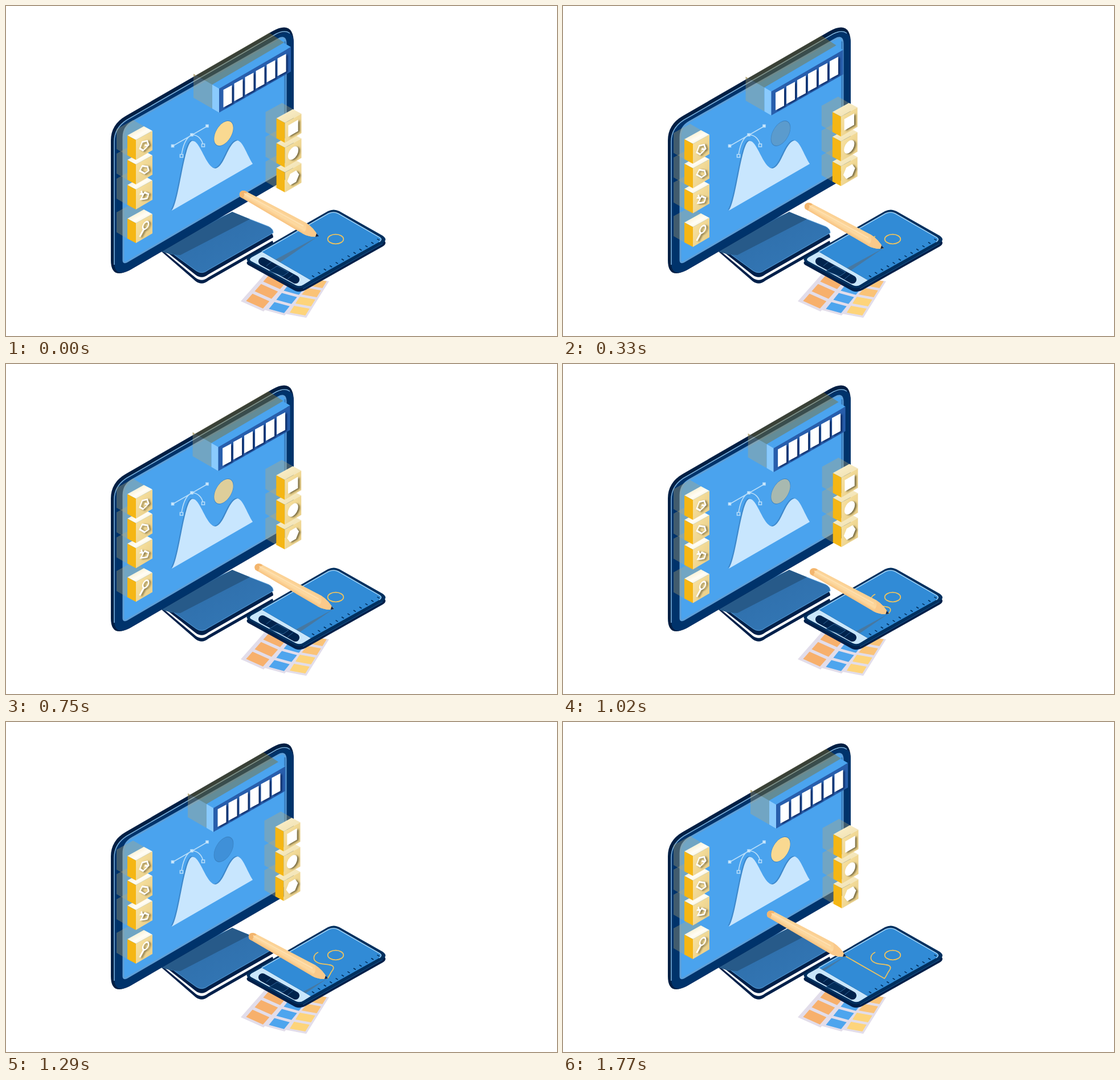
An HTML page for the animation above (1.8 s loop, 967x579 px).

```html
<!DOCTYPE html>
<html lang="en">
<head>
<meta charset="utf-8">
<title>Design workspace</title>
<style>
  html, body { margin: 0; width: 100%; height: 100%; overflow: hidden; background: #fff; }
  svg { display: block; width: 967px; height: 579px; }
  .cast { filter: drop-shadow(3px 1px 1.5px rgba(50, 45, 20, .6)); }
  .castBlue { filter: drop-shadow(3px 1px 1.5px rgba(0, 20, 70, .7)); }
  .ghost { fill: rgba(185, 168, 115, .35); }
  .ghostLid { fill: rgba(130, 110, 40, .44); }
</style>
</head>
<body>
<svg viewBox="0 0 967 579">
  <defs>
    <linearGradient id="lid" x1="0" y1="0" x2="1" y2="1">
      <stop offset="0" stop-color="#f5e3ac"/><stop offset=".55" stop-color="#fffdf6"/><stop offset="1" stop-color="#f8e6b4"/>
    </linearGradient>
    <linearGradient id="lidRight" x1="0" y1="0" x2="1" y2="1">
      <stop offset="0" stop-color="#fdf1cd"/><stop offset="1" stop-color="#eedfae"/>
    </linearGradient>
    <linearGradient id="front" x1="0" y1="0" x2="1" y2="1">
      <stop offset="0" stop-color="#fae4a4"/><stop offset="1" stop-color="#e6cb84"/>
    </linearGradient>
    <linearGradient id="wood" gradientUnits="userSpaceOnUse" x1="-70" y1="-48" x2="-80" y2="-31">
      <stop offset="0" stop-color="#fbd092"/><stop offset=".45" stop-color="#fdd9a0"/><stop offset="1" stop-color="#f5b56c"/>
    </linearGradient>
    <linearGradient id="stand" x1="0" y1="0" x2="1" y2="1">
      <stop offset="0" stop-color="#2d6ba6"/><stop offset="1" stop-color="#3479b8"/>
    </linearGradient>
    <path id="hills" d="M291 359C304 341 312 244 326 237C340 232 350 283 367 285C383 284 389 240 406 236C416 237 423 262 433 277Z"/>
    <path id="plate" d="M428 439L565 360Q575 355 585 360L661 403Q671 410 661 416L526 492Q516 498 506 493L428 450Q417 445 428 439Z"/>
    <clipPath id="glass"><path d="M449 431L566 364Q575 360 583 364L656 406Q661 410 655 414L535 481Z"/></clipPath>
  </defs>

  <g id="layers"></g>
  <path d="M270 430L397 361L428 374L306 437L290 436Z" fill="#275a89"/>

  <g id="monitor">
    <path d="M184 236Q184 208 210 193L468 44Q505 24 505 66V272Q505 296 488 306L216 464Q184 480 184 446Z" fill="#011f44"/>
    <path d="M190 450V238Q190 214 212 201L474 51Q505 36 505 66V272Q505 296 488 306L218 463Q190 477 190 450Z" fill="#00336b"/>
    <path d="M190 454V238Q190 214 212 200L474 49Q490 41 498 48" fill="none" stroke="#78aedb" stroke-width="1.6"/>
    <path d="M206 446V230Q206 212 222 203L478 58Q491 51 491 66V286L215 447Q206 453 206 446Z" fill="#4aa3ee" stroke="#5e9fd8" stroke-width="3"/>
    <path d="M489.500 62V286" stroke="#3b82c4" stroke-width="3"/>
  </g>

  <g id="artwork">
    <use href="#hills" x="-2" y="-1" fill="#3d88cb"/>
    <use href="#hills" fill="#c8e6fe"/>
    <g transform="matrix(.866 -.5 0 1 382 223.5)">
      <circle r="19.5" fill="#3f90d8" stroke="#3a82c2"/>
      <circle id="sun" r="19.3" fill="#f9d991"/>
    </g>
    <g fill="none" stroke="#b9def9" stroke-width="1.6">
      <path d="M292 246L353 211M308 262C311 240 318 230 326 226C338 226 344 235 346 244"/>
      <path d="M305.500 260.500h5v5h-5zM343.500 242h5v5h-5z" fill="#4aa3ee"/>
      <path d="M290.500 243.500h4v4h-4zM351 208.500h4v4h-4zM324 224h4v4h-4z" fill="#d4ecfd"/>
    </g>
  </g>

  <g id="bar">
    <path class="ghost" d="M329 119L362 138V180L329 161Z"/>
    <path class="ghostLid" d="M329 124L462 47L488 64L362 138L329 119Z"/>
    <path d="M362 138L488 65L500 72L374 145Z" fill="#4ba4ef"/>
    <path d="M362 138L374 145V187L362 180Z" fill="#8acafd"/>
    <path d="M374 145L500 72V115L374 187Z" fill="#285eac"/>
    <g id="windows" class="castBlue" fill="#fff"></g>
  </g>
  <g id="leftTools"></g>
  <g id="rightTools"></g>

  <g id="swatches"></g>

  <g id="tablet">
    <use href="#plate" y="6" fill="#00204a"/>
    <use href="#plate" fill="#01305f"/>
    <path d="M521 496L661 417" stroke="#1d5b95"/>
    <path d="M431 441L449 431L535 481L522 489Q516 493 509 490L431 448Q425 445 431 441Z" fill="#c9e6fb"/>
    <path d="M449 431L566 364Q575 360 583 364L656 406Q661 410 655 414L535 481Z" fill="#318bd6"/>
    <path d="M449 431L566 364Q575 360 583 364L656 406Q661 410 655 414" fill="none" stroke="#9fd2f7" stroke-width="1.5"/>
    <path d="M450 448L508 480" stroke="#00234d" stroke-width="14" stroke-linecap="round"/>
    <path d="M462 465L476 456L496 467L486 474ZM457 456L466 449M494 479L504 471" fill="#022c59" stroke="#2d6297"/>
    <path id="ticks" stroke="#00305f" stroke-width="1.6"/>
    <ellipse cx="578.500" cy="409" rx="13.800" ry="8.300" fill="none" stroke="#edc35f" stroke-width="1.8"/>
    <path id="trace" d="M548 404C539 408 538 417 545 421C553 426 560 424 567 426C575 427 577 431 572 437C569 441 567 447 564 450L496 411" fill="none" stroke="#edc35f" stroke-width="1.8"/>
    <g clip-path="url(#glass)">
      <path id="shade" d="M0 0L-92 50L-85 58Z" fill="#536f86" opacity=".65"/>
    </g>
  </g>

  <g id="pencil">
    <path d="M-137 -69C-141 -77 -134 -82 -127 -79L-22 -24Q-8 -15 0 0Q-14 3 -28 -5Z" fill="url(#wood)"/>
    <path d="M-137 -69C-141 -77 -134 -82 -127 -79L-124 -77Q-131 -74 -132 -66Z" fill="#f3b56d"/>
    <path d="M-130 -75L-26 -18" stroke="#fee0b0" stroke-width="2"/>
    <path d="M-22 -24Q-8 -15 0 0Q-14 3 -28 -5Q-18 -10 -22 -24Z" fill="#fac98a"/>
    <path d="M-3 -5L1 0L-5 1Z" fill="#10264a"/>
  </g>
</svg>
<script>
const LOOP = 1800, STEP = 30;
const byId = id => document.getElementById(id);
const quad = (fill, points) => `<polygon points="${points}" fill="${fill}"/>`;
const range = (n, make) => Array.from({ length: n }, (_, i) => make(i)).join("");

// One layer of the stand; its hidden corner spreads less than its front drops.
const slab = (drop, paint) => `<path ${paint} d="M397 ${362 + drop}L461 ${387 + drop}
  Q469 ${391 + drop} 469 ${398 + drop}L355 ${463 + drop}Q344 ${472 + drop} 333 ${464 + drop}
  L${270 - drop * .4} ${418 + drop * .2}Z"/>`;
byId("layers").innerHTML = slab(19, `fill="#00204a"`) + slab(13, `fill="#fff"`) +
  slab(8, `fill="#00204a"`) + slab(0, `fill="url(#stand)" stroke="#5b9fd8"`);

const toolIcons = [
  `<path d="M-9 1L-4 -8L6 -5L9 4L-2 8ZM1 0L7 4"/>`,
  `<path d="M-9 -3L-4 -9L7 -2L9 6L1 7Z"/>`,
  `<path d="M-9 -6L-2 -3M-6 -10L-3 0M-7 4L1 -4L9 3L6 9L0 7Z"/>`,
  `<circle cx="3" cy="-4" r="6"/><path d="M-1 1L-9 10" stroke-width="4"/>`
];
const shapeIcons = [
  `<rect x="-10" y="-10" width="20" height="20"/>`,
  `<circle r="10.5"/>`,
  `<path d="M-12 0L-6 -10H6L12 0L6 10H-6Z"/>`
];

// One isometric cube with a face icon.
function cube(x, y, icon, paint, lid) {
  return `<g transform="translate(${x} ${y})">
    ${quad(lid, "213,227 242,211 257,219 228,235")}
    ${quad("#f5b614", "213,227 228,235 228,270 213,262")}
    ${quad("url(#front)", "228,235 257,219 257,253 228,270")}
    <g class="cast"><g transform="matrix(.866 -.5 0 1 242.5 244.5)" ${paint}>${icon}</g></g></g>`;
}
const trail = (x, y) => `<path class="ghost" transform="translate(${x} ${y})"
  d="M194 216L223 200L242 211L213 227V262L194 251Z"/>`;

function stack(x, offsets, icons, paint, lid) {
  const trails = offsets.map(y => trail(x, y)).join("");
  const cubes = offsets.map((y, i) => cube(x, y, icons[i], paint, lid)).reverse().join("");
  return trails + cubes;
}
byId("leftTools").innerHTML = stack(0, [0, 43, 87, 146], toolIcons,
  `fill="none" stroke="#fff" stroke-width="2.6"`, "url(#lid)");
byId("rightTools").innerHTML = stack(261.5, [-30, 13.5, 57], shapeIcons, `fill="#fff"`, "url(#lidRight)");

byId("windows").innerHTML = range(6, i =>
  `<path transform="translate(${i * 19} ${i * -11})" d="M381.500 147L396.500 139V170L381.500 178Z"/>`);
byId("ticks").setAttribute("d", range(12, i => `M${537 + i * 10.4} ${473 - i * 5.85}l4 2.500`));

// A paper strip with four colour patches; "across" and "up" are its edges.
function card([x, y], across, up, colors) {
  const at = (a, u) => `${x + across[0] * a + up[0] * u},${y + across[1] * a + up[1] * u}`;
  const cell = (fill, a0, a1, u0, u1) => quad(fill, [at(a0, u0), at(a1, u0), at(a1, u1), at(a0, u1)].join(" "));
  return cell("#e2ddea", 0, 1, 0, 4) +
    colors.map((fill, i) => cell(fill, .16, .9, i + .2, i + .95)).join("");
}
const orange = "#f7b06c", blue = "#4ea5ee", yellow = "#fdd47b", amber = "#fac377";
byId("swatches").innerHTML =
  card([490, 540], [37, 7], [10, -16], [yellow, yellow, amber, amber]) +
  card([453, 533], [36, 10], [13, -16], [blue, blue, blue, blue]) +
  card([412, 518], [40, 18], [15, -17], [orange, orange, orange, orange]);

// Linear interpolation through [time, value] keys.
function tween(keys, t) {
  const last = keys[keys.length - 1];
  if (t >= last[0]) return last[1];
  const i = keys.findIndex(key => key[0] > t);
  const [t0, v0] = keys[i - 1], [t1, v1] = keys[i];
  return v0 + (v1 - v0) * (t - t0) / (t1 - t0);
}

const trace = byId("trace"), total = trace.getTotalLength();
const corner = total - Math.hypot(68, 39);
const sway = [[0, 0], [390, 1], [810, 0], [1290, 1], [1770, 0]];
const drawn = [[0, 0], [330, corner - 37], [750, corner - 23], [1020, corner - 14], [1290, corner], [1770, total]];
const move = (id, x, y) => byId(id).setAttribute("transform", `translate(${x} ${y})`);

function render(t) {
  const p = tween(sway, t);
  move("bar", -10 * p, 6 * p);
  move("leftTools", 0, 8 * p);
  move("rightTools", -2 * p, -13 * p);
  byId("sun").setAttribute("opacity", 1 - p);

  const length = tween(drawn, t);
  const tip = trace.getPointAtLength(length);
  trace.setAttribute("stroke-dasharray", `${length} 999`);
  move("pencil", tip.x, tip.y);
  move("shade", tip.x, tip.y);
}

const start = performance.now();
function tick() {
  const t = (performance.now() - start) % LOOP;
  render(Math.floor(t / STEP) * STEP);
  requestAnimationFrame(tick);
}
tick();
</script>
</body>
</html>
```
